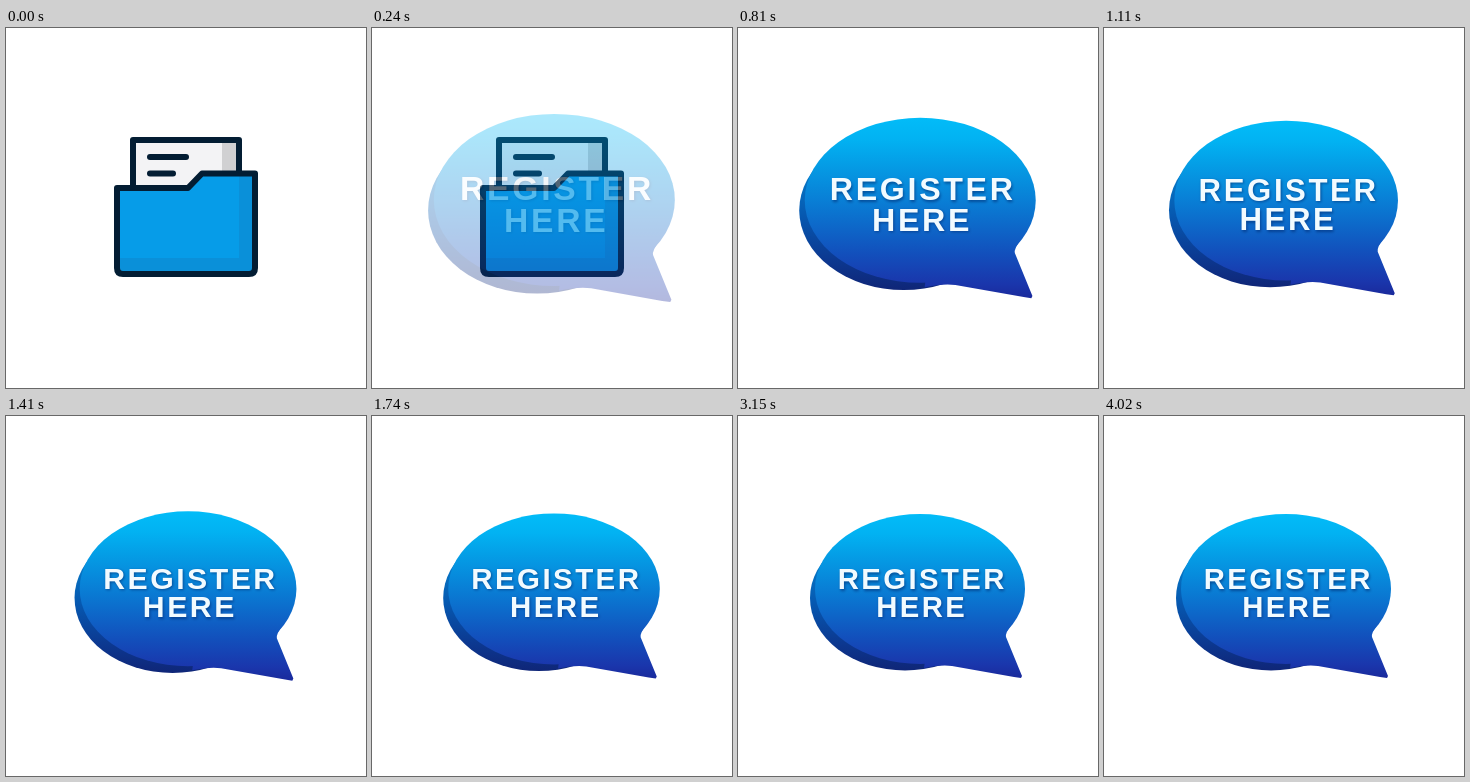
Animation of 360x360 px, one loop 4050 ms. Source, as an HTML page with a canvas:

```html
<!DOCTYPE html>
<html lang="en">
<head>
<meta charset="utf-8">
<style>
  html, body { margin: 0; width: 100%; height: 100%; overflow: hidden; background: #fff; }
  canvas { position: absolute; left: 0; top: 0; width: 360px; height: 360px; }
</style>
</head>
<body>
<canvas id="folder" width="360" height="360"></canvas>
<canvas id="bubble" width="360" height="360"></canvas>
<script>
const LOOP = 4050, FADE = 740, SETTLE = 2025, START_SCALE = 1.153;
const bubble = document.getElementById('bubble');
const back = document.getElementById('folder').getContext('2d');
const ctx = bubble.getContext('2d');

function vertical(c, y0, y1, stops) {
  const g = c.createLinearGradient(0, y0, 0, y1);
  stops.forEach(([at, color]) => g.addColorStop(at, color));
  return g;
}

function drawFolder(c) {
  const line = (x0, x1, y) => {
    c.beginPath();
    c.moveTo(x0, y);
    c.lineTo(x1, y);
    c.stroke();
  };
  c.fillStyle = '#fff';
  c.fillRect(0, 0, 360, 360);
  c.lineWidth = 6;
  c.lineJoin = c.lineCap = 'round';
  c.strokeStyle = '#031d33';

  // paper
  c.fillStyle = '#f3f3f5';
  c.fillRect(127, 112, 106, 60);
  c.fillStyle = '#d0d0d2';
  c.fillRect(216, 112, 17, 60);
  c.strokeRect(127, 112, 106, 60);
  line(144, 180, 129);
  line(144, 167, 145.5);

  // pocket
  const body = new Path2D(
    'M111 160H182L196 145.5H249V240Q249 246 243 246H117Q111 246 111 240Z');
  c.fillStyle = '#069ce8';
  c.fill(body);
  c.save();
  c.clip(body);
  c.fillStyle = '#0a90d9';
  c.fillRect(233, 140, 20, 110);
  c.fillRect(108, 230, 130, 20);
  c.restore();
  c.stroke(body);
}

const face = new Path2D();
face.ellipse(182, 173, 105, 75, 0, 0, Math.PI * 2);
const tail = new Path2D('M255 195L274 208Q267 217 268 221L284 260L283 262L276 261L214 250Q203 248.5 186 252L190 225Z');
const side = new Path2D();
side.ellipse(167, 182, 95, 72.5, 0, 0, Math.PI * 2);

const faceFill = vertical(ctx, 98, 262, [
  [0, '#02bcf8'], [0.12, '#02b2f2'], [0.25, '#049ee6'], [0.5, '#0a78d2'],
  [0.75, '#1250bc'], [0.92, '#1a36ac'], [1, '#1a2a9c']
]);
const sideFill = vertical(ctx, 120, 254, [
  [0, '#0692d8'], [0.5, '#0658b0'], [0.8, '#0c3890'], [1, '#0f2678']
]);

function drawBubble(scale) {
  ctx.setTransform(1, 0, 0, 1, 0, 0);
  ctx.fillStyle = '#fff';
  ctx.fillRect(0, 0, 360, 360);
  ctx.translate(179.7, 180);
  ctx.scale(scale, scale);
  ctx.translate(-179.7, -180);

  ctx.fillStyle = sideFill;
  ctx.fill(side);
  ctx.fillStyle = faceFill;
  ctx.fill(tail);
  ctx.fill(face);

  ctx.save();
  ctx.font = 'bold 29.3px "Liberation Sans", Arial, sans-serif';
  ctx.letterSpacing = '2.4px';
  ctx.fillStyle = '#f2fbff';
  ctx.shadowColor = 'rgba(0, 40, 110, 0.6)';
  ctx.shadowBlur = 3;
  ctx.shadowOffsetX = 1;
  ctx.shadowOffsetY = 1.5;
  ctx.fillText('REGISTER', 99.8, 173);
  ctx.fillText('HERE', 138.2, 200.7);
  ctx.restore();
}

function frame(now) {
  const t = now % LOOP;
  const left = (1 + Math.cos(Math.PI * Math.min(t / SETTLE, 1))) / 2;
  drawBubble(1 + (START_SCALE - 1) * left);
  bubble.style.opacity = Math.min(t / FADE, 1);
  requestAnimationFrame(time => frame(Math.max(0, time - begin)));
}

drawFolder(back);
const begin = performance.now();
frame(0);
</script>
</body>
</html>
```
